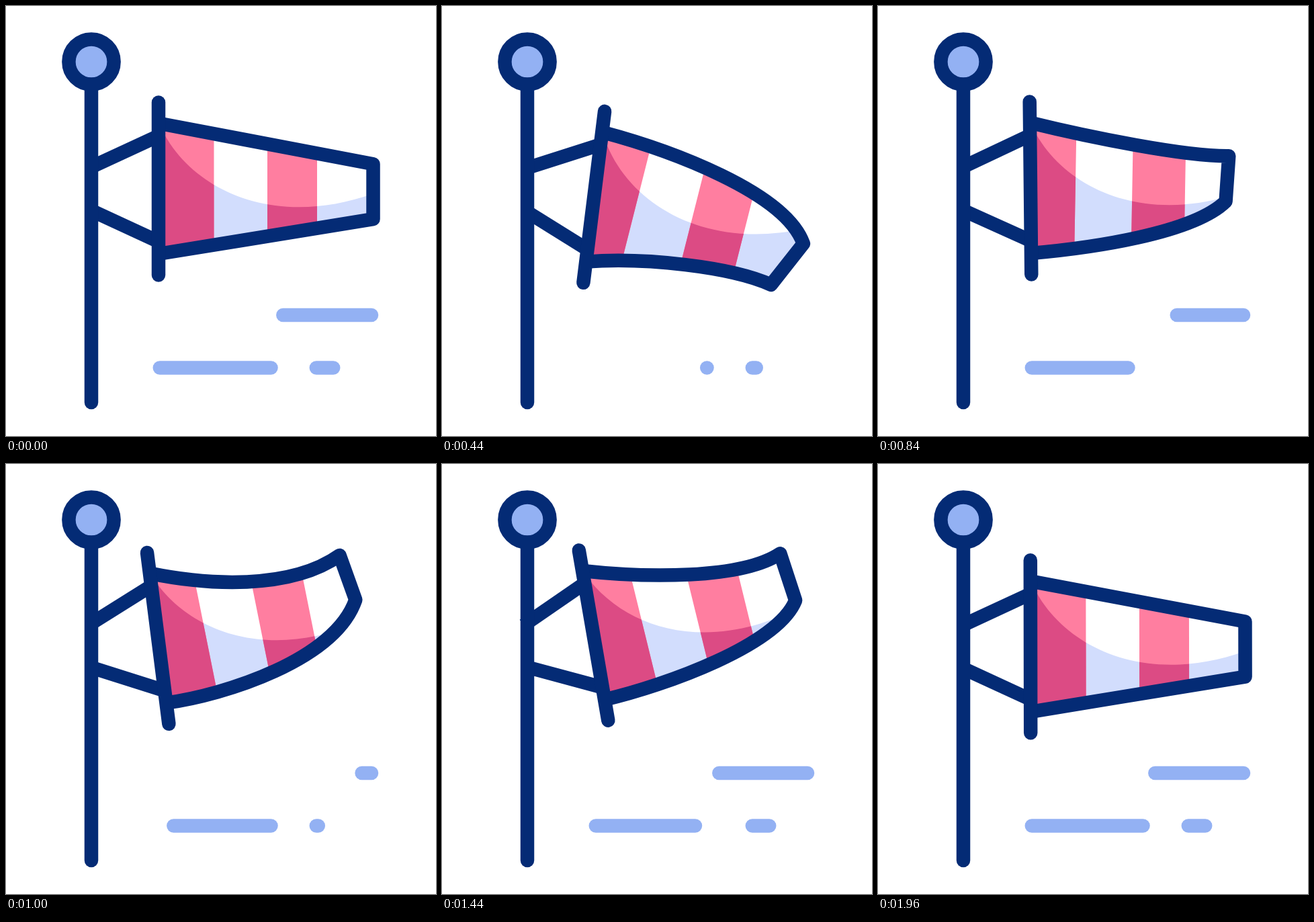
Write an HTML page with a canvas that moves like this. It is 640x640 px and loops after 2000 ms.

```html
<!DOCTYPE html>
<html lang="en">
<head>
<meta charset="utf-8">
<title>Windsock</title>
<style>
  html, body { margin: 0; width: 100%; height: 100%; overflow: hidden; background: #fff; }
  canvas { display: block; width: 640px; height: 640px; }
</style>
</head>
<body>
<canvas id="stage" width="640" height="640"></canvas>
<script>
const ctx = document.getElementById('stage').getContext('2d');
const LOOP = 2000, STEP = 40, LINE = 20.5;
const NAVY = '#042b75', BLUE = '#93b1f3', SHADE = '#d2ddfd', PINK = '#ff7ea0', ROSE = '#dc4b84';
const PIVOT = [127, 272];
const TOP = [227, 174.5], BOTTOM = [227, 369];

const mix = (a, b, k) => Array.isArray(a) ? a.map((v, i) => mix(v, b[i], k)) : a + (b - a) * k;

function ease(t, start, length) {
  const u = Math.min(1, Math.max(0, (t - start) / length));
  return u * u * (3 - 2 * u);
}

// eased motion through [time, value] keys
function sample(keys, t) {
  const i = Math.max(1, keys.findIndex(([time]) => time > t));
  const [t0, v0] = keys[i - 1], [t1, v1] = keys[i];
  return mix(v0, v1, ease(t, t0, t1 - t0));
}

const tilt = t => sample([[0, 0], [450, 7.1], [550, 7.1], [1220, -12.1], [LOOP, 0]], t);

// pose 0 rest, 1 down, 2 up, 3 rest again
const pose = (t, upTime) => sample([[0, 0], [525, 1], [600, 1], [upTime, 2], [1220, 2], [1830, 3], [LOOP, 3]], t);

function blend(poses, p) {
  const i = Math.min(2, Math.floor(p));
  return mix(poses[i], poses[(i + 1) % 3], p - i);
}

// an edge is two handles and a corner, seen from the hoop
const straight = (from, to) => [mix(from, to, 1 / 3), mix(from, to, 11 / 12), to];
const TOP_EDGE = [
  straight(TOP, [546.5, 235.2]),
  [[328.6, 187.9], [507.6, 229.3], [544.7, 307.5]],
  [[307.8, 202.1], [430.5, 226.4], [510.8, 183.7]]
];
const BOTTOM_EDGE = [
  straight(BOTTOM, [546.5, 317.2]),
  [[310.7, 351.5], [436.6, 351.8], [501.4, 373]],
  [[314.4, 368.3], [484.1, 337.6], [526, 252.3]]
];
// how stripes shift, squeeze and lean in each pose
const STRIPES = [[0, 0, 0], [5.7, 0.0945, -0.134], [6.2, 0.027, 0.1]];

const GUSTS = [
  { x1: 412.3, x2: 544, y: 460, wipe: [0, 340], draw: [440, 290] },
  { x1: 228.8, x2: 394.5, y: 538.5, wipe: [112, 336], draw: [550, 376] },
  { x1: 461.8, x2: 487.2, y: 538.5, wipe: [0, 160], draw: [346, 300] }
];
const REDRAW = 590;

function line(x1, y1, x2, y2, color, cap) {
  ctx.beginPath();
  ctx.moveTo(x1, y1);
  ctx.lineTo(x2, y2);
  ctx.lineCap = cap;
  ctx.strokeStyle = color;
  ctx.stroke();
}

function clothPath(t) {
  const p = new Path2D(), now = pose(t, 1000);
  const [near, far, corner] = blend(BOTTOM_EDGE, now);
  p.moveTo(...TOP);
  p.bezierCurveTo(...blend(TOP_EDGE, now).flat());
  p.lineTo(...corner);
  p.bezierCurveTo(...far, ...near, ...BOTTOM);
  return p;
}

function shadePath() {
  const p = new Path2D();
  p.moveTo(230, 180);
  p.bezierCurveTo(275, 275, 400, 332, 547, 279);
  p.lineTo(640, 480);
  p.lineTo(200, 480);
  p.lineTo(200, 180);
  return p;
}

function stripePath(t) {
  const p = new Path2D();
  const [shift, squeeze, lean] = blend(STRIPES, pose(t, 1110));
  const at = (x, y) => [x - shift - squeeze * (463 - x) + lean * (y - 275), y];
  for (const [left, right] of [[190, 309.5], [389, 463]]) {
    p.moveTo(...at(left, 100));
    p.lineTo(...at(right, 100));
    p.lineTo(...at(right, 450));
    p.lineTo(...at(left, 450));
    p.closePath();
  }
  return p;
}

const shade = shadePath();

function drawSock(t) {
  const cloth = clothPath(t), stripes = stripePath(t);
  ctx.save();
  ctx.translate(...PIVOT);
  ctx.rotate(tilt(t) * Math.PI / 180);
  ctx.translate(-PIVOT[0], -PIVOT[1]);

  ctx.save();
  ctx.clip(cloth);
  ctx.fillStyle = SHADE;
  ctx.fill(shade);
  ctx.fillStyle = PINK;
  ctx.fill(stripes);
  ctx.clip(stripes);
  ctx.fillStyle = ROSE;
  ctx.fill(shade);
  ctx.restore();

  ctx.strokeStyle = NAVY;
  ctx.lineCap = 'butt';
  ctx.stroke(cloth);
  for (const side of [-1, 1]) {
    line(127, 272 + side * 32.4, 227, 272 + side * 78.6, NAVY, 'butt');
  }
  line(227, 143.5, 227, 400.5, NAVY, 'round');
  ctx.restore();
}

function drawPole() {
  line(127, 110, 127, 590, NAVY, 'round');
  ctx.beginPath();
  ctx.arc(127, 83, 33.6, 0, 2 * Math.PI);
  ctx.fillStyle = BLUE;
  ctx.fill();
  ctx.stroke();
}

// each gust is wiped and drawn twice; the second wipe follows the first draw
function drawGust({ x1, x2, y, wipe, draw }, t) {
  const part = (from, to) => {
    if (to - from > 0.001) line(mix(x1, x2, from), y, mix(x1, x2, to), y, BLUE, 'round');
  };
  const drawn = draw[0] + draw[1];
  part(ease(t, ...wipe), 1);
  part(ease(t, drawn, wipe[1]), ease(t, ...draw));
  part(0, ease(t - REDRAW, ...draw));
}

function frame() {
  const t = Math.floor(performance.now() % LOOP / STEP) * STEP;
  ctx.fillStyle = '#fff';
  ctx.fillRect(0, 0, 640, 640);
  ctx.lineWidth = LINE;
  ctx.lineJoin = 'round';
  GUSTS.forEach(g => drawGust(g, t));
  drawSock(t);
  drawPole();
  requestAnimationFrame(frame);
}
frame();
</script>
</body>
</html>
```
